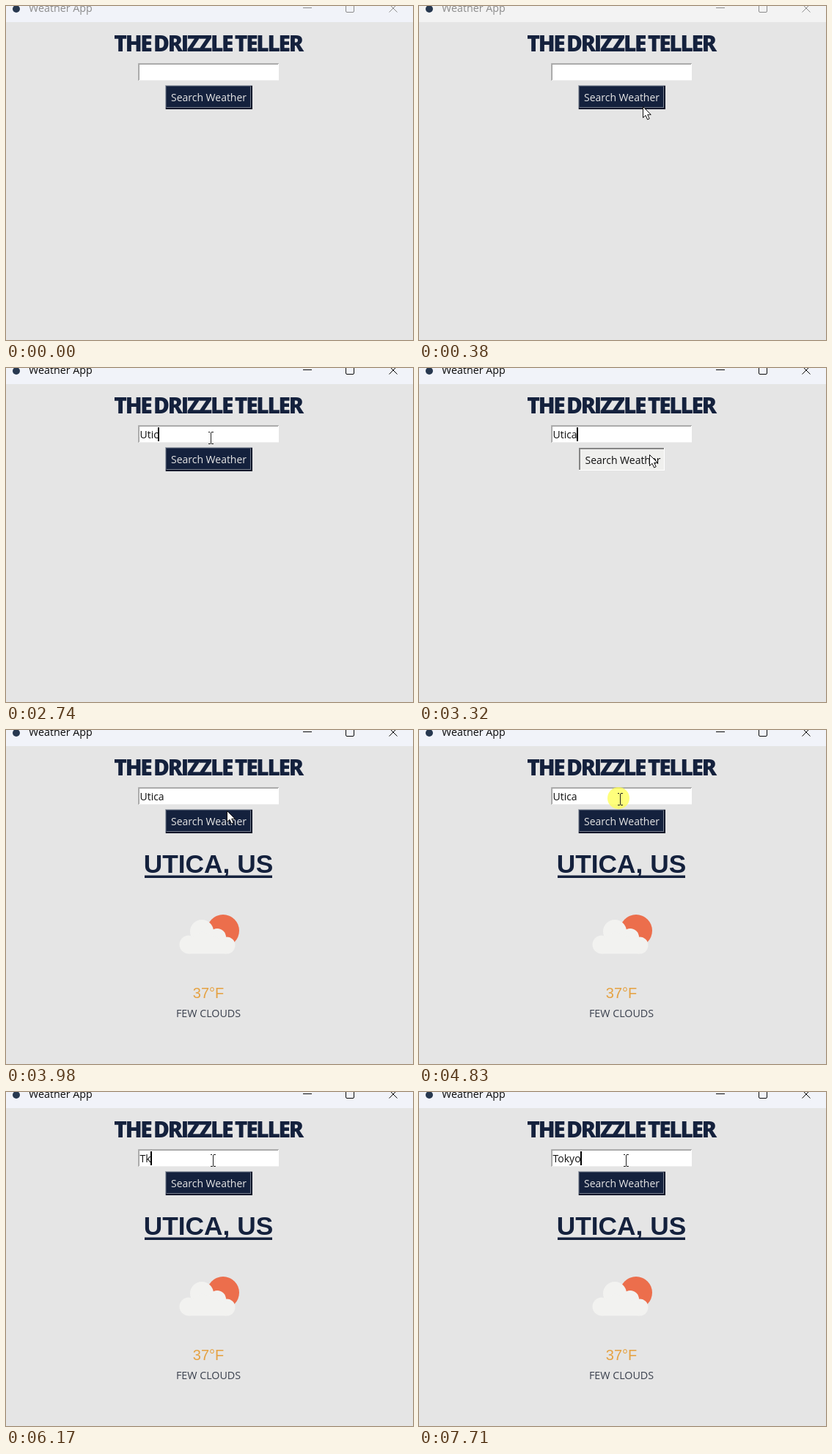
An HTML page for the animation above (8000 ms loop, 555 by 456 pixels).

```html
<!DOCTYPE html>
<html lang="en">
<head>
<meta charset="utf-8">
<title>Weather App</title>
<style>
  html, body { margin: 0; width: 100%; height: 100%; overflow: hidden; background: #e5e5e5; }
  svg { display: block; width: 555px; height: 456px; }
  text { white-space: pre; }
  .ui { font: 14px "Open Sans", "Noto Sans", sans-serif; }
  .mid { text-anchor: middle; }
  .heading { font: 800 30px "Open Sans", "Noto Sans", sans-serif; font-stretch: 75%; letter-spacing: -2.3px; word-spacing: -2px; fill: #14213d; }
  .city { font: bold 35.3px "Liberation Sans", Arial, sans-serif; fill: #14213d; }
  .temp { font: 20px "Liberation Sans", Arial, sans-serif; fill: #e5a243; }
  .line { fill: none; shape-rendering: crispEdges; }
</style>
</head>
<body>
<svg viewBox="0 0 555 456">
  <rect width="555" height="456" fill="#e5e5e5"/>
  <rect id="bar" width="555" height="22"/>
  <circle cx="14" cy="4" r="5" fill="#27384f"/>
  <text id="caption" class="ui" x="31" y="8" style="font-size:14.3px">Weather App</text>
  <g id="controls" fill="none">
    <path d="M405 2.5h12"/>
    <rect x="463.5" y="-2.5" width="11" height="11" rx="1.5"/>
    <path d="M522.5 -2.5l11 11m0 -11l-11 11"/>
  </g>

  <text class="heading mid" x="275.5" y="62">THE DRIZZLE TELLER</text>

  <rect x="180" y="78" width="192" height="24" fill="#fff"/>
  <path class="line" d="M180.5 102V78.5H372" stroke="#b4b4b4"/>
  <path class="line" d="M181.5 101V79.5H371" stroke="#a0a0a0"/>
  <path class="line" d="M181 101.5H372" stroke="#f0f0f0"/>
  <rect id="selection" x="183" y="81" height="19" fill="#0078d7"/>
  <text id="entry" class="ui" x="182.5" y="95.5"></text>
  <rect id="caret" y="81" width="2" height="19"/>

  <g id="idle">
    <rect x="217" y="108" width="119" height="33" fill="#14213d"/>
    <path class="line" d="M217.5 141V108.5H336" stroke="#a3a8b1"/>
    <path class="line" d="M218.5 140V109.5H334" stroke="#3f4a61"/>
    <path class="line" d="M219 138.5H333.5V110" stroke="#757d8d"/>
    <path class="line" d="M218 140H335V109" stroke="#0d1629" stroke-width="2"/>
    <text class="ui mid" x="276.5" y="129.5" fill="#e5e5e5">Search Weather</text>
  </g>
  <g id="pressed">
    <rect x="218" y="109" width="117" height="31" fill="#f0f0ee"/>
    <path class="line" d="M218.5 139V109.5H334" stroke="#858585" stroke-width="2"/>
    <path class="line" d="M218 139.5H334.5V109" stroke="#fff"/>
    <text class="ui mid" x="278" y="130.5" fill="#111">Search Weather</text>
  </g>

  <g id="result">
    <text class="city mid" x="276" y="195">UTICA, US</text>
    <rect x="189" y="198.5" width="174" height="3.5" fill="#14213d"/>
    <circle cx="296" cy="274" r="22" fill="#ec6e4c"/>
    <g fill="#f2f2f0">
      <circle cx="249" cy="293" r="12.5"/>
      <circle cx="267" cy="275" r="16"/>
      <circle cx="288" cy="283" r="12"/>
      <circle cx="301" cy="294" r="11.5"/>
      <path d="M249 305.5V285L267 275L288 283L301 290V305.5Z"/>
    </g>
    <text class="temp mid" x="276" y="366">37°F</text>
    <text class="ui mid" x="276" y="392" fill="#3b414e" style="font-size:14.3px">FEW CLOUDS</text>
  </g>

  <circle id="halo" r="15" fill="#ffff50" opacity=".75"/>
  <path id="arrow" d="M.5 .5V15.5L4 12.3L6.6 18L9.2 16.8L6.7 11.3H11.3Z" fill="#fff" stroke="#111"/>
  <path id="beam" class="line" d="M-3 -7.5H-1M1 -7.5H4M.5 -7V8M-3 8.5H0M1 8.5H4" stroke="#222"/>
</svg>
<script>
const LOOP = 8000;
const el = id => document.getElementById(id);
const [bar, caption, controls, selection, entry, caret, idle, pressed, result, halo, arrow, beam] =
  ["bar", "caption", "controls", "selection", "entry", "caret", "idle", "pressed", "result", "halo", "arrow", "beam"].map(el);

// time, x, y
const path = [
  [60, 350, 430], [220, 325, 260], [380, 305, 137], [500, 288, 108], [640, 278, 95],
  [1880, 278, 95], [1910, 279, 95], [2925, 279, 95], [3070, 314, 118],
  [3790, 314, 118], [4370, 274, 94], [5220, 274, 94], [5270, 281, 93],
  [5530, 281, 93], [5560, 282, 93]
];
const typed = [
  [0, ""], [2010, "U"], [2240, "Ut"], [2310, "Uti"], [2540, "Utic"], [2800, "Utica"],
  [5880, "T"], [6170, "Tk"], [6580, "T"], [6880, "To"], [7210, "Tok"], [7300, "Toky"], [7480, "Tokyo"]
];
const caretOn = [[970, 1570], [1870, 2480], [2740, 3790], [4070, 4670], [4930, 5530], [5860, 6480], [6810, 7410], [7710, LOOP]];
const clicks = [[970, 1100], [3270, 3320], [4800, 4930], [4980, 5090]];

const within = (t, spans) => spans.some(([a, b]) => t >= a && t < b);
const show = (node, on) => node.setAttribute("visibility", on ? "visible" : "hidden");
const place = (node, x, y) => node.setAttribute("transform", `translate(${x} ${y})`);
const ramp = (t, a, b) => Math.min(1, Math.max(0, (t - a) / (b - a)));
const mix = (a, b, k) => `rgb(${a.map((v, i) => Math.round(v + (b[i] - v) * k))})`;

function pointer(t) {
  const i = path.findIndex(p => p[0] > t);
  if (i < 0) return path.at(-1).slice(1);
  if (i === 0) return path[0].slice(1);
  const [a, x, y] = path[i - 1], [b, u, v] = path[i];
  const k = ramp(t, a, b);
  return [Math.round(x + (u - x) * k), Math.round(y + (v - y) * k)];
}

function drawBar(t) {
  const focus = ramp(t, 970, 1130);
  const tint = Math.max(1 - ramp(t, 30, 200), focus);
  const ink = mix([140, 140, 140], [10, 10, 10], focus);
  bar.setAttribute("fill", mix([243, 243, 243], [241, 243, 249], tint));
  caption.setAttribute("fill", ink);
  controls.setAttribute("stroke", ink);
}

function drawEntry(t) {
  const text = typed.findLast(step => step[0] <= t)[1];
  const selected = within(t, [[4980, 5880]]);
  if (entry.textContent !== text) entry.textContent = text;
  const width = text ? entry.getComputedTextLength() : 0;
  entry.setAttribute("fill", selected ? "#fff" : "#111");
  selection.setAttribute("width", width);
  show(selection, selected);
  caret.setAttribute("x", Math.round(182 + width));
  show(caret, within(t, caretOn));
}

function drawPointer(t) {
  const [x, y] = pointer(t);
  const overEntry = x > 180 && x < 372 && y > 78 && y < 102;
  const visible = t >= 60;
  place(arrow, x, y);
  place(beam, x, y);
  place(halo, overEntry ? x - 2 : x, overEntry ? y - 1 : y);
  show(arrow, visible && !overEntry);
  show(beam, visible && overEntry);
  show(halo, within(t, clicks));
}

function draw(t) {
  const down = within(t, [[3270, 3790]]);
  drawBar(t);
  drawEntry(t);
  show(idle, !down);
  show(pressed, down);
  show(result, t >= 3790);
  drawPointer(t);
}

const start = performance.now();
function tick() {
  draw((performance.now() - start) % LOOP);
  requestAnimationFrame(tick);
}
tick();
</script>
</body>
</html>
```
